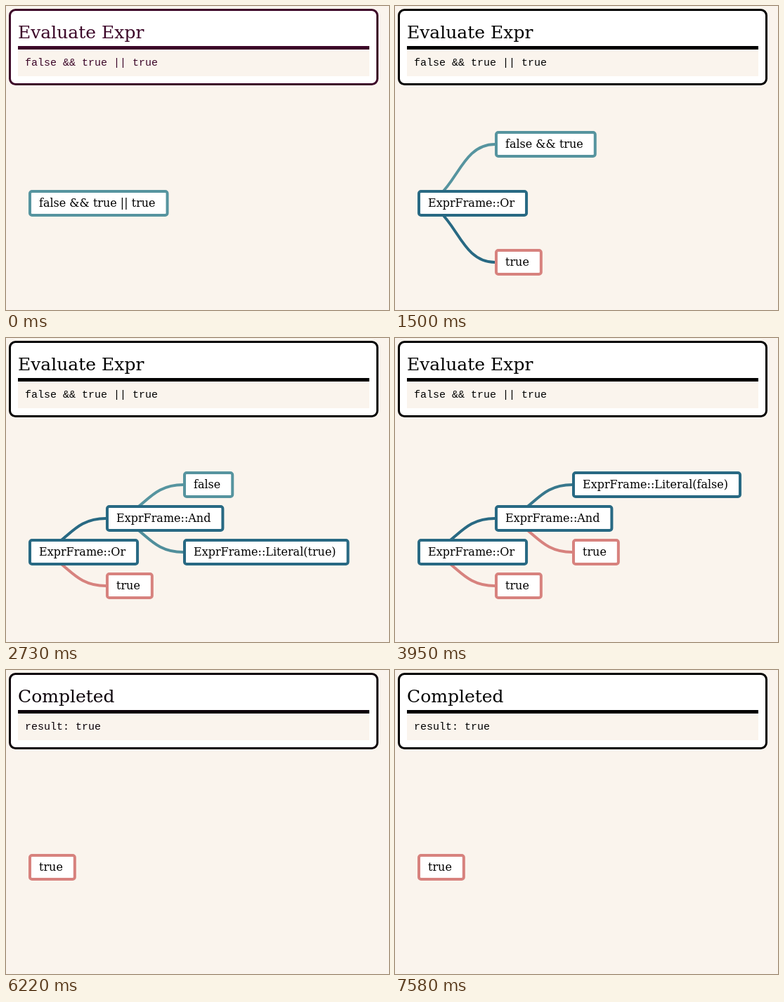
An HTML page with a canvas that plays this animation: 545x433 px, repeating every 7660 ms.

```html
<!DOCTYPE html>
<html lang="en">
<head>
<meta charset="utf-8">
<title>Expression evaluation</title>
<style>
  html, body { margin: 0; width: 100%; height: 100%; overflow: hidden; background: #faf4ed; }
  canvas { display: block; }
</style>
</head>
<body>
<canvas width="545" height="433"></canvas>
<script>
const ctx = document.querySelector('canvas').getContext('2d');
const LOOP = 7660, FIRST = 322, STEP = 586, MOVE = 200, DONE = 6182;
const FLASH_HALF = 680, FLASH_START = -204, FLASH_COLOR = [199, 21, 133];
const BASE = '#faf4ed', SERIF = '"DejaVu Serif", serif';
const SEED = [86, 148, 159], FRAME = [40, 105, 131], VALUE = [215, 130, 126];

const parents = { root: null, left: 'root', right: 'root', a: 'left', b: 'left' };
const columns = { root: 32, left: 142, right: 142, a: 252, b: 252 };

// Each edit changes some nodes of the tree; null removes a node.
const edits = [
  { root: ['false && true || true', SEED] },
  { root: ['ExprFrame::Or', FRAME], left: ['false && true', SEED], right: ['true', SEED] },
  { right: ['ExprFrame::Literal(true)', FRAME] },
  { right: ['true', VALUE] },
  { left: ['ExprFrame::And', FRAME], a: ['false', SEED], b: ['true', SEED] },
  { b: ['ExprFrame::Literal(true)', FRAME] },
  { b: ['true', VALUE] },
  { a: ['ExprFrame::Literal(false)', FRAME] },
  { a: ['false', VALUE] },
  { left: ['false', VALUE], a: null, b: null },
  { root: ['true', VALUE], left: null, right: null }
];

function rowsOf(nodes) {
  if (nodes.a) return { root: 305, left: 257, right: 353, a: 209, b: 305 };
  return { root: 281, left: 197, right: 365 };
}

let nodes = {};
const states = edits.map(edit => {
  nodes = { ...nodes, ...edit };
  return { nodes, rows: rowsOf(nodes) };
});

const lerp = (a, b, p) => a + (b - a) * p;
const rgb = c => `rgb(${c.map(Math.round)})`;
const mix = (a, b, p) => rgb(a.map((v, i) => lerp(v, b[i], p)));
const cubicInOut = p => p < .5 ? 4 * p ** 3 : 1 - 4 * (1 - p) ** 3;

function box(x, y, w, h, r, line, color) {
  ctx.beginPath();
  ctx.roundRect(x, y, w, h, r);
  ctx.fillStyle = '#fff';
  ctx.fill();
  ctx.lineWidth = line;
  ctx.strokeStyle = color;
  ctx.stroke();
}

function write(text, x, y, font, color) {
  ctx.font = font;
  ctx.fillStyle = color;
  ctx.fillText(text, x, y);
}

function drawPanel(t) {
  const done = t >= DONE;
  const age = t - (done ? DONE : FLASH_START);
  const glow = Math.max(0, 1 - Math.abs(age / FLASH_HALF - 1));
  const color = mix([0, 0, 0], FLASH_COLOR, glow);
  box(5.5, 5.5, 523, 106, 8, 3, color);
  write(done ? 'Completed' : 'Evaluate Expr', 17, 46, `25px ${SERIF}`, color);
  ctx.fillRect(17, 57, 500, 5);
  ctx.fillStyle = BASE;
  ctx.fillRect(17, 62, 500, 38);
  write(done ? 'result: true' : 'false && true || true', 27, 85,
    '15px "Liberation Mono", monospace', color);
}

// Position, size and colours of every visible node at progress p between two states.
function poseTree(from, to, p) {
  const poses = {};
  for (const id in parents) {
    const old = from.nodes[id], now = to.nodes[id], up = parents[id];
    if (!now && (!old || p === 1)) continue;
    const start = old ? id : up, end = now ? id : up;
    const [label, color] = now || old;
    poses[id] = {
      label, color, up,
      x: lerp(columns[start], columns[end], p),
      y: lerp(from.rows[start], to.rows[end], p),
      size: lerp(old ? 1 : 0, now ? 1 : 0, p),
      link: mix((old || now)[1], color, p)
    };
  }
  return poses;
}

function drawLink({ x, y, link }, parent) {
  const mid = (x + parent.x) / 2;
  ctx.beginPath();
  ctx.moveTo(parent.x, parent.y);
  ctx.bezierCurveTo(mid, parent.y, mid, y, x, y);
  ctx.lineWidth = 4;
  ctx.strokeStyle = link;
  ctx.stroke();
}

function drawNode({ label, color, x, y, size }) {
  ctx.font = `16px ${SERIF}`;
  const width = ctx.measureText(label).width + 30;
  box(x + 2, y - 17, width * size, 34 * size, 3, 4, rgb(color));
  ctx.globalAlpha = size;
  write(label, x + 15, y + 5, ctx.font, '#000');
  ctx.globalAlpha = 1;
}

function drawTree(t) {
  const last = states.length - 1;
  const k = Math.min(last, Math.max(0, Math.floor((t - FIRST) / STEP) + 1));
  const age = t - FIRST - (k - 1) * STEP;
  const p = cubicInOut(Math.min(1, age / MOVE));
  const poses = poseTree(states[Math.max(0, k - 1)], states[k], p);
  const list = Object.values(poses);
  list.forEach(pose => pose.up && drawLink(pose, poses[pose.up]));
  list.forEach(drawNode);
}

function draw() {
  const t = performance.now() % LOOP;
  ctx.fillStyle = BASE;
  ctx.fillRect(0, 0, 545, 433);
  drawPanel(t);
  drawTree(t);
  requestAnimationFrame(draw);
}
draw();
</script>
</body>
</html>
```
